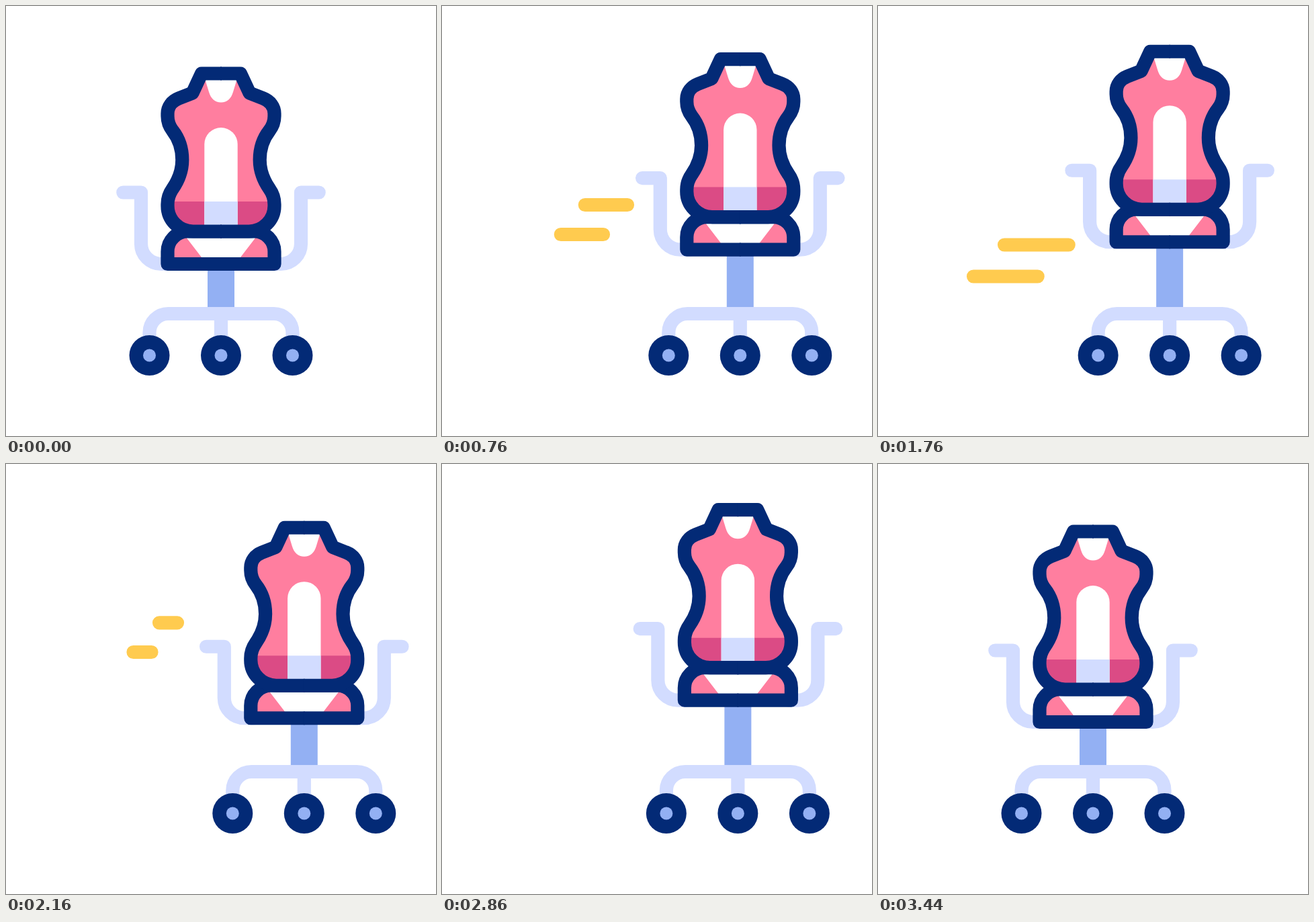
These frames come from a looping animation (640 by 640 pixels, 3.6 s). An HTML page:

```html
<!DOCTYPE html>
<html lang="en">
<head>
<meta charset="utf-8">
<title>Rolling chair</title>
<style>
  html, body { margin: 0; width: 100%; height: 100%; overflow: hidden; background: #fff; }
  svg { display: block; width: 100vw; height: 100vh; }
  .line { fill: none; stroke-width: 20.2; stroke-linejoin: round; }
  .pale { stroke: #d2dcff; }
  .navy { stroke: #032a76; }
  .dash { stroke: #ffcb4f; stroke-linecap: round; }
</style>
</head>
<body>
<svg viewBox="0 0 640 640">
  <defs>
    <!-- Left halves; the right ones are mirrored -->
    <path id="back" d="M321 100.5H291L277.5 129.5L257 137.5C247 141.5 240.5 150 240.5 160V164C240.5 172 243 179 248 185.5C257 197 262.3 212 262.3 229C262.3 246 257 259 248 272C243 279 240.5 286 240.5 295V297A38 38 0 0 0 278.5 335.5H321"/>
    <path id="seat" d="M321 335.5H270.5A30 30 0 0 0 240.5 365.5V384H321"/>
    <path id="arm" d="M174.3 277.5H201V354A30 30 0 0 0 231 384H245" stroke-linecap="round"/>
    <g id="wheel"><circle r="30" fill="#032a76"/><circle r="9.5" fill="#93b0f3"/></g>
    <clipPath id="inBack">
      <use href="#back"/>
      <use href="#back" transform="matrix(-1 0 0 1 640 0)"/>
    </clipPath>
  </defs>

  <g id="dashes"></g>

  <g id="chair">
    <path d="M300 350H340V458H300Z" fill="#93b0f3"/>
    <path class="line pale" d="M213.5 520V486A28 28 0 0 1 241.5 458H398.5A28 28 0 0 1 426.5 486V520M320 458V520"/>
    <use href="#wheel" x="213.5" y="520"/>
    <use href="#wheel" x="320" y="520"/>
    <use href="#wheel" x="426.5" y="520"/>

    <g id="body">
      <g class="line pale">
        <use href="#arm"/>
        <use href="#arm" transform="matrix(-1 0 0 1 640 0)"/>
      </g>
      <g fill="#ff7e9f">
        <use href="#seat"/>
        <use href="#seat" transform="matrix(-1 0 0 1 640 0)"/>
      </g>
      <path d="M261 335H379L349 374V384H291V374Z" fill="#fff"/>
      <g class="line navy">
        <use href="#seat"/>
        <use href="#seat" transform="matrix(-1 0 0 1 640 0)"/>
      </g>
      <g clip-path="url(#inBack)">
        <path d="M220 90H420V340H220Z" fill="#ff7e9f"/>
        <path d="M293.5 100L302 128C305 138 311 143.5 320 143.5C329 143.5 335 138 338 128L346.5 100Z" fill="#fff"/>
        <path d="M220 291H420V340H220Z" fill="#db4b85"/>
        <path d="M295.3 340V205.7A24.7 24.7 0 0 1 344.7 205.7V340Z" fill="#fff"/>
        <path d="M295.3 291H344.7V340H295.3Z" fill="#d2dcff"/>
      </g>
      <g class="line navy">
        <use href="#back"/>
        <use href="#back" transform="matrix(-1 0 0 1 640 0)"/>
      </g>
    </g>
  </g>
</svg>
<script>
const LOOP = 3600, END = 3440;
const byId = id => document.getElementById(id);
const chair = byId('chair'), body = byId('body');

function ease(u) {
  u = Math.min(1, Math.max(0, u));
  return u * u * (3 - 2 * u);
}

// Eased back and forth: 0 at even u, 1 at odd u
const swing = u => ease(1 - Math.abs(u % 2 - 1));

// Roll out, rock three times, roll home
function slide(t) {
  const out = 600, home = 2700, reach = 137;
  if (t < out) return reach * ease(t / out);
  if (t > home) return reach * ease((END - t) / (END - home));
  return reach - 30 * swing((t - out) / 350);
}

// Three bounces, the same forwards and backwards in time
function bob(t) {
  const rise = 520, s = Math.max(0, Math.min(t, END - t));
  return -33.2 * (s < rise ? ease(s / rise) : swing((s - rise) / 600 + 1));
}

// Pairs of speed lines: the upper line's right end, the length,
// and the step from the upper line to the lower one
const bursts = [
  { x: 276, y: 296, len: 96, dx: -36, dy: 44 },
  { x: 307.7, y: 127.7, len: 105, dx: -104, dy: 50 },
  { x: 283.7, y: 355.5, len: 127, dx: -46, dy: 47 },
  { x: 255, y: 236.3, len: 89, dx: -38.5, dy: 43.7 }
];
const FIRST = 585, EVERY = 490, GROW = 290, FADE_AT = 255, FADE = 300;

const dashes = bursts.map(() => {
  const el = document.createElementNS('http://www.w3.org/2000/svg', 'path');
  el.setAttribute('class', 'line dash');
  byId('dashes').append(el);
  return el;
});

function dashPath({ x, y, len, dx, dy }, age) {
  const head = ease(age / GROW), tail = ease((age - FADE_AT) / FADE);
  if (head <= tail) return '';
  const run = len * (tail - head);
  return [0, 1].map(i => `M${x + dx * i - len * tail} ${y + dy * i}h${run}`).join('');
}

function draw(t) {
  chair.setAttribute('transform', `translate(${slide(t)} 0)`);
  body.setAttribute('transform', `translate(0 ${bob(t)})`);
  dashes.forEach((el, i) => el.setAttribute('d', dashPath(bursts[i], t - FIRST - EVERY * i)));
}

const begin = performance.now();
function tick() {
  draw((performance.now() - begin) % LOOP);
  requestAnimationFrame(tick);
}
tick();
</script>
</body>
</html>
```
